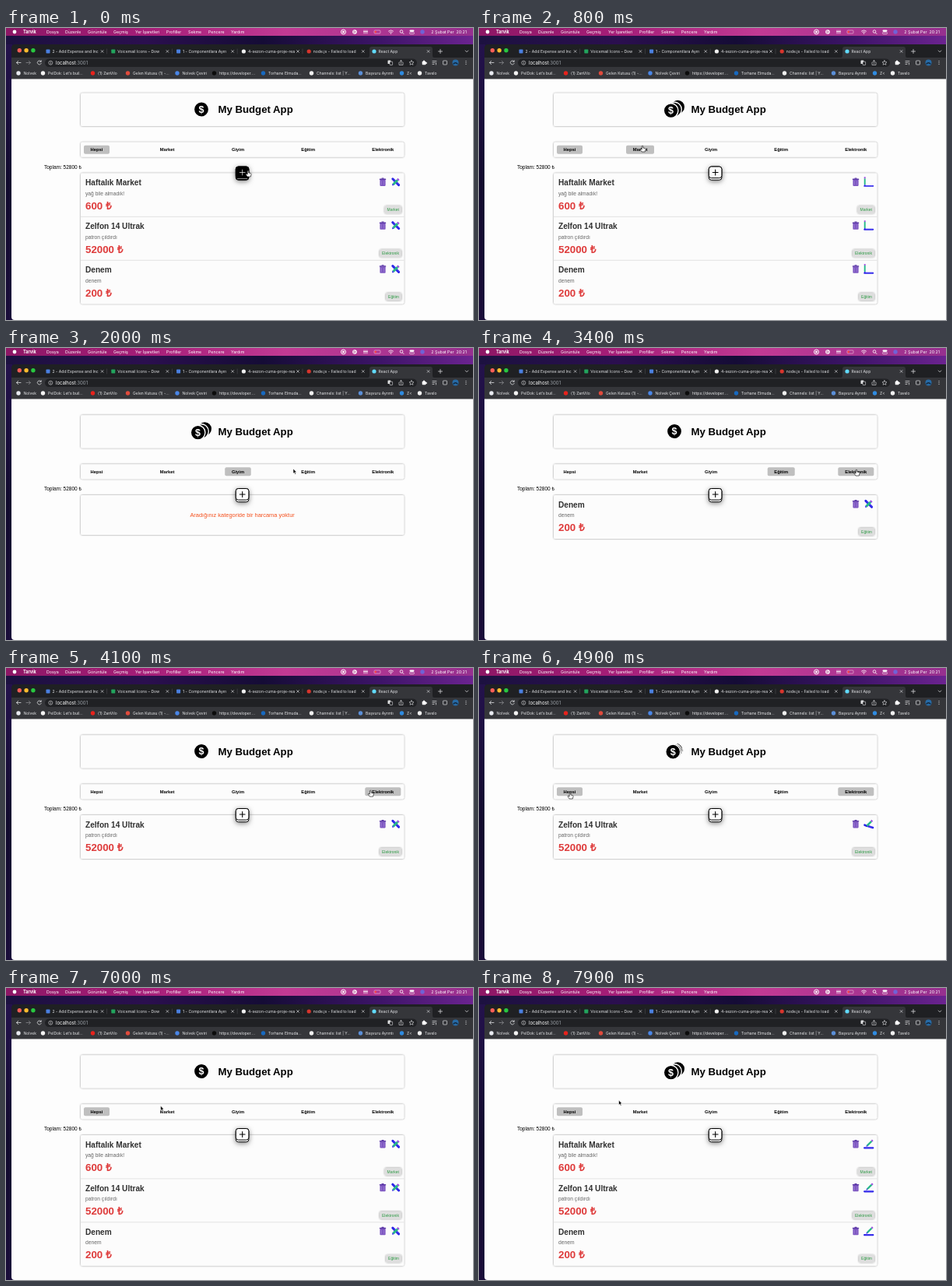
Animation, 600 px wide and 375 px high, one loop 8 s. Source, as an HTML page:

```html
<!DOCTYPE html>
<html lang="tr">
<head>
<meta charset="utf-8">
<title>My Budget App</title>
<style>
  html, body { margin: 0; width: 100%; height: 100%; overflow: hidden; background: #120b2c; }
  svg { display: block; width: 100vw; height: 100vh; }
  svg svg { width: 61px; height: 13px; }
  text { white-space: pre; }
  .ui { font-family: Inter, Roboto, sans-serif; }
  .page { font-family: "Liberation Sans", Arial, sans-serif; }
  .bold { font-weight: 700; }
</style>
</head>
<body>
<svg viewBox="0 0 600 375" xmlns="http://www.w3.org/2000/svg">
  <defs>
    <linearGradient id="bar">
      <stop offset="0" stop-color="#8d1765"/><stop offset=".3" stop-color="#a51e78"/>
      <stop offset=".6" stop-color="#c23a94"/><stop offset="1" stop-color="#96308f"/>
    </linearGradient>
    <linearGradient id="wall">
      <stop offset="0" stop-color="#1c1140"/><stop offset=".3" stop-color="#2b0f4f"/>
      <stop offset=".55" stop-color="#150c36"/><stop offset=".8" stop-color="#3d1468"/>
      <stop offset="1" stop-color="#6c2390"/>
    </linearGradient>
    <linearGradient id="side" x2="0" y2="1">
      <stop offset="0" stop-color="#24124c"/><stop offset=".5" stop-color="#120b2e"/>
      <stop offset="1" stop-color="#1a0d3a"/>
    </linearGradient>
    <filter id="soft" x="-10%" y="-20%" width="120%" height="140%">
      <feDropShadow dx="0" dy="0" stdDeviation="1.1" flood-opacity=".48"/>
    </filter>
    <filter id="glow" x="-60%" y="-60%" width="220%" height="220%">
      <feDropShadow dx="0" dy="1.5" stdDeviation="3.4" flood-opacity=".5"/>
    </filter>
    <clipPath id="window"><path d="M12 21H600V375H11Q7 375 7 371V26Q7 21 12 21Z"/></clipPath>
  </defs>
  <g id="desktop"></g>
  <g clip-path="url(#window)"><g id="page" class="page"></g></g>
  <g id="pointer"></g>
</svg>
<script>
const LOOP = 8000, STEP = 100;
const byId = id => document.getElementById(id);

// Drawing helpers
const rect = (x, y, w, h, fill, r = 0, extra = '') =>
  `<rect x="${x}" y="${y}" width="${w}" height="${h}" rx="${r}" fill="${fill}" ${extra}/>`;
const dot = (x, y, r, fill, extra = '') => `<circle cx="${x}" cy="${y}" r="${r}" fill="${fill}" ${extra}/>`;
const line = (d, color, width = .8, extra = '') =>
  `<path d="${d}" fill="none" stroke="${color}" stroke-width="${width}" stroke-linecap="round" stroke-linejoin="round" ${extra}/>`;
const text = (x, y, size, fill, label, extra = '') =>
  `<text x="${x}" y="${y}" font-size="${size}" fill="${fill}" ${extra}>${label}</text>`;
const group = (x, y, body, angle = 0) => `<g transform="translate(${x} ${y}) rotate(${angle})">${body}</g>`;
const MIDDLE = 'text-anchor="middle"', BOLD = 'class="bold"';

// Eased interpolation over [time, ...values] keys
function track(t, keys) {
  const next = keys.findIndex(k => k[0] > t);
  if (next < 0) return keys[keys.length - 1].slice(1);
  if (next === 0) return keys[0].slice(1);
  const a = keys[next - 1], b = keys[next];
  const u = (t - a[0]) / (b[0] - a[0]), e = u * u * (3 - 2 * u);
  return a.slice(1).map((v, i) => v + (b[i + 1] - v) * e);
}

// Desktop and browser window
const menus = [[52, 'Dosya'], [76, 'Düzenle'], [105, 'Görüntüle'], [138, 'Geçmiş'], [166, 'Yer İşaretleri'],
  [206, 'Profiller'], [234, 'Sekme'], [260, 'Pencere'], [289, 'Yardım']];
const tabs = [['#4a7fe0', '2 - Add Expense and Inc'], ['#22a45d', 'Voicemail Icons – Dow'],
  ['#4a7fe0', '1 - Componentlara Ayırı'], ['#f0f0f0', '4-sezon-cuma-proje-rea'],
  ['#d8342c', 'node.js - Failed to load'], ['#61dafb', 'React App']];
const bookmarks = [[16, '#e8eaf0', 'Nolvek'], [47.5, '#f2f2f2', 'PelDok: Let’s buil...'], [111.5, '#e8221c', '(1) ZanVilo'],
  [156.5, '#e04a3c', 'Gelen Kutusu (1) -...'], [220, '#4a86e8', 'Nolvek Çeviri'], [267.5, '#0c0c0c', 'https://developer....'],
  [330.5, '#1769c0', 'Torhane Elmuda...'], [392.5, '#f2f2f2', 'Channels: list | Y...'], [455.5, '#5b8fd8', 'Başvuru Ayrıntı'],
  [508.5, '#2f8be0', 'Z&lt;'], [531.5, '#f2f2f2', 'Tavelo']];

function menuBar() {
  const white = '#fff';
  return rect(0, 0, 600, 375, 'url(#wall)') + rect(0, 21, 8, 354, 'url(#side)') + rect(0, 0, 600, 10, 'url(#bar)') +
    dot(11, 5, 2.4, white) + text(22, 7, 5.5, white, 'Tarvik', BOLD) +
    menus.map(([x, label]) => text(x, 7, 5.3, white, label)).join('') +
    dot(433.5, 5, 3, 'none', 'stroke="#fff"') + dot(433.5, 5, 1.5, white) +
    dot(448, 5, 2.8, white) + line('M447.2 3.7L449.5 5L447.2 6.3Z', '#a63383', .6) +
    line('M460 3V7M462 3V7M464 3V7M459.5 4.5H464.5', white, .7) +
    rect(473, 3, 8, 4, 'none', 1, 'stroke="#f3c4e2" stroke-width=".6"') + rect(473.7, 3.7, 2, 2.6, '#ff4438', .4) +
    line('M491.5 4Q494.5 1.5 497.5 4M492.8 5.5Q494.5 4 496.2 5.5', white) + dot(494.5, 7, .7, white) +
    dot(508, 4.5, 1.8, 'none', 'stroke="#fff" stroke-width=".8"') + line('M509.4 6L511 7.6', white) +
    rect(518.5, 2.4, 6, 2.3, white, 1.1) + rect(518.5, 5.4, 6, 2.3, 'none', 1.1, 'stroke="#fff" stroke-width=".6"') +
    dot(535, 5, 2.7, '#6f62d6') + text(592, 7, 5.3, white, '2 Şubat Per  20:21', 'text-anchor="end"');
}

function tabStrip() {
  let out = rect(7, 21, 593, 18, '#1f2023') + ['#ff5f57', '#febc2e', '#28c840'].map((c, i) => dot(17.3 + i * 8.8, 28.8, 2.7, c)).join('');
  out += '<path d="M465 38Q467 38 467 35V27Q467 24 470 24H545Q548 24 548 27V35Q548 38 550 38Z" fill="#35363a"/>';
  tabs.forEach(([color, label], i) => {
    const x = 54 + i * 83.8, end = x + 69.6;
    out += i > 2 ? dot(x, 30, 2.6, color) : rect(x - 2.5, 27.5, 5, 5, color, .8);
    out += `<svg x="${x + 5}" y="24" width="61" height="13">${text(.5, 8, 5.1, '#e4e5e8', label)}</svg>`;
    out += line(`M${end - 1.4} 28.6l2.8 2.8m0 -2.8l-2.8 2.8`, '#d5d6d8', .7);
    if (i < 4) out += line(`M${end + 6} 27V33`, '#55565a', .5);
  });
  return out + line('M555.5 30H560.5M558 27.5V32.5', '#d5d6d8') + line('M590.2 29L592 30.8L593.8 29', '#d5d6d8');
}

function toolbar() {
  const pale = '#dfe0e2';
  return rect(7, 38, 593, 28, '#35363a') + rect(50, 39.5, 478, 10.5, '#202124', 5.2) +
    line('M19 44.5H13.5M15.7 42.3L13.5 44.5L15.7 46.7', pale) + line('M26 44.5H31.5M29.3 42.3L31.5 44.5L29.3 46.7', '#85868a') +
    line('M45 43A2.5 2.5 0 1 0 45.2 45.5M45.2 41.7V43.3H43.6', pale) +
    dot(57.3, 44.7, 2.5, 'none', `stroke="${pale}" stroke-width=".6"`) + line('M57.3 44.5V46M57.3 43.3V43.4', pale, .6) +
    text(64, 46.7, 6, '#fff', 'localhost<tspan fill="#9aa0a6">:3001</tspan>') +
    rect(490.5, 41.5, 3.8, 4.6, pale, .6) + rect(493, 43.2, 3.6, 4.4, '#202124', .6, `stroke="${pale}" stroke-width=".6"`) +
    line('M505.7 44H505V47.5H510V44H509.3M507.5 46V41.5M506.2 42.7L507.5 41.4L508.8 42.7', pale, .6) +
    line('M521 41.6l.9 2 2.1.2-1.6 1.4.5 2.1-1.9-1.1-1.9 1.1.5-2.1-1.6-1.4 2.1-.2Z', pale, .6) +
    rect(534.7, 42.7, 4.8, 4.6, '#fff', .7) + dot(537, 42.4, 1, '#fff') + dot(540, 45, 1, '#fff') +
    line('M548 42.5H553M548 44.5H551M548 46.5H550M552.5 44.5V47', pale, .7) +
    rect(561.5, 42, 5, 5, 'none', .6, `stroke="${pale}" stroke-width=".7"`) +
    dot(577.5, 44.5, 4, '#276aa5') + line('M575 46Q577 43.5 580 46', '#11263c', 1.4) +
    [42.5, 44.5, 46.5].map(y => dot(591, y, .6, pale)).join('') +
    bookmarks.map(([x, color, label]) => dot(x, 58, 2.7, color) + text(x + 6.6, 60, 5, '#e8e9eb', label)).join('');
}

byId('desktop').innerHTML = `<g class="ui">${menuBar()}<g clip-path="url(#window)">${tabStrip()}${toolbar()}${rect(7, 65.5, 593, 310, '#fdfdfd')}</g></g>`;

// Page data
const nav = [['Hepsi', 116.5, 33], ['Market', 207, 36], ['Giyim', 298, 33.5], ['Eğitim', 388.2, 35], ['Elektronik', 484.3, 46]];
const expenses = [
  { title: 'Haftalık Market', note: 'yağ bile almadık!', price: '600 ₺', kind: 'Market', tag: 21.5 },
  { title: 'Zelfon 14 Ultrak', note: 'patron çıldırdı', price: '52000 ₺', kind: 'Elektronik', tag: 28 },
  { title: 'Denem', note: 'denem', price: '200 ₺', kind: 'Eğitim', tag: 20 }
];

// Timelines
const clicks = [[0, 'Hepsi'], [1000, 'Market'], [1700, 'Giyim'], [2300, 'Eğitim'], [3800, 'Elektronik'], [5100, 'Hepsi']];
const pointerKeys = [[0, 311, 183], [100, 311, 183], [800, 210, 151], [1200, 209, 155], [1600, 299, 156], [1800, 302, 156],
  [2000, 369, 155], [2200, 388, 156], [2700, 390, 156], [3300, 485, 156], [4000, 484, 157], [4800, 117, 160],
  [5200, 117, 160], [5800, 301.5, 190], [6400, 301.5, 190], [7200, 179.5, 144]];
const coinKeys = [[200, 0], [600, 1], [2300, 1], [2700, 0], [4750, 0], [5100, 1], [5500, 1], [5900, 0], [7300, 0], [7700, 1]];
// ruler y, ruler angle, pencil x, pencil y, pencil angle, thickness
const crossed = [0, 45, 0, 0, -45, 3], drawing = [5.2, 0, 1.3, -1, -45, 2.3], upright = [5.2, 0, -5, -1, -90, 1.9];
const penKeys = [[200, ...crossed], [500, ...drawing], [750, ...upright], [900, ...upright], [1500, ...crossed],
  [4700, ...crossed], [5050, ...drawing], [5250, ...upright], [5800, ...crossed], [7250, ...crossed], [7700, ...drawing]];

function coins(spread) {
  const at = k => [251 + k * spread, 107 - 2.5 * (1 - spread) - k * spread * .72];
  const coin = ([x, y]) => dot(x, y, 9.6 - spread * .3, '#000', 'stroke="#fcfcfc" stroke-width="1.4"');
  const front = at(-4.4);
  front[1] -= spread * 1.6;
  return coin(at(4.4)) + coin(at(0)) + coin(front) + text(front[0], front[1] + 4.4, 12.5, '#fff', '$', `${BOLD} ${MIDDLE}`);
}

function trash() {
  return rect(-3.6, -3, 7.2, 8.2, '#7e57c2', .8) + rect(-4.2, -4.2, 8.4, 1.5, '#5e3aa8', .5) +
    rect(-1.6, -5.2, 3.2, 1.3, '#5e3aa8', .4) + line('M-1.5 -1V3.5M1.5 -1V3.5', '#a58ad8', .6);
}

function pen([rulerY, rulerAngle, x, y, angle, width]) {
  const butt = 'style="stroke-linecap:butt"';
  const ruler = line('M-5.5 0H5.5', '#2a22e6', width) + line('M-3.5 -.4H5', '#6a5cff', .7, 'stroke-dasharray=".6 1.3"');
  const pencil = line('M-4.5 0H3.5', '#27b889', width, butt) +
    `<path d="M-4.5 ${-width / 2}L-6.6 0L-4.5 ${width / 2}Z" fill="#2a22e6"/>` + line('M3.5 0H5.4', '#9a4be0', width, butt);
  return group(0, rulerY, ruler, rulerAngle) + group(x, y, pencil, angle);
}

function expense(item, top, pose) {
  const left = 508 - item.tag;
  return text(102, top + 15.7, 10.1, '#303030', item.title, BOLD) + text(102, top + 28.4, 6.7, '#666', item.note) +
    text(102, top + 46.3, 13.3, '#de3b3b', item.price, BOLD) +
    group(484, top + 11.2, trash()) + group(500.7, top + 11.2, pen(pose)) +
    rect(left, top + 42, item.tag, 9.8, '#dedede', 2, 'filter="url(#soft)"') +
    text(left + item.tag / 2, top + 48.6, 5, '#2e9a45', item.kind, MIDDLE);
}

function addButton(hover) {
  const ink = hover ? '#fff' : '#000', face = hover ? '#000' : '#fcfcfc', edge = 'stroke="#000" stroke-width="1"';
  return `<g filter="url(#glow)">${rect(295.3, 180.5, 16.6, 17.2, face, 3.2, edge)}</g>` +
    rect(295.3, 180.5, 16.6, 14.6, face, 3.2, edge) +
    (hover ? line('M297.5 196H309.8', '#e8e8e8', .6) : '') + line('M300.3 188H307.1M303.7 184.6V191.4', ink, hover ? .7 : 1.1);
}

const panel = (y, h) => rect(96, y, 415.3, h, '#fcfcfc', 2, 'filter="url(#soft)"');
const scrollAt = t => t < 1000 ? -2.5 : 0;

function hoverAt(t) {
  const [x, y] = track(t, pointerKeys), py = y - scrollAt(t);
  if (x > 295 && x < 312.5 && py > 180 && py < 198) return 'add';
  const hit = nav.find(([, cx, w]) => Math.abs(x - cx) < w / 2 && py > 152.5 && py < 164.5);
  return hit ? hit[0] : '';
}

function page(t) {
  const active = clicks.filter(c => c[0] <= t).pop()[1], hover = hoverAt(t);
  const shown = expenses.filter(e => active === 'Hepsi' || e.kind === active);
  const pose = track(t, penKeys), height = shown.length ? shown.length * 55.9 : 51;
  let out = panel(86.3, 42.3) + group(0, 2.5 * (1 - track(t, coinKeys)[0]), coins(track(t, coinKeys)[0])) +
    text(272.5, 111.7, 13.2, '#000', 'My Budget App', BOLD) + panel(149.2, 19);
  for (const [label, x, w] of nav) {
    if (label === active || label === hover) out += rect(x - w / 2, 153.3, w, 11, '#bfbfbf', 2);
    out += text(x, 160.9, 5.8, '#000', label, `${BOLD} ${MIDDLE}`);
  }
  out += text(49, 183, 6.5, '#000', 'Toplam: 52800 ₺') + panel(189, height);
  shown.forEach((item, i) => {
    const top = 189 + i * 55.9;
    if (i) out += line(`M96 ${top}H511`, '#d9d9d9', .7);
    out += expense(item, top, pose);
  });
  if (!shown.length) out += text(303.6, 216.8, 7.45, '#f4511e', 'Aradığınız kategoride bir harcama yoktur', MIDDLE);
  return group(0, scrollAt(t), out + addButton(hover === 'add'));
}

function pointer(t) {
  const [x, y] = track(t, pointerKeys);
  const hand = hoverAt(t) && hoverAt(Math.max(0, t - STEP));
  const shape = hand
    ? 'M-.8 .6Q0 -.5 .8 .6V3L3.4 3.6Q4.3 4 4 5.2L3.3 8H-.9L-3 5Q-3 4 -2 4.2L-.8 5.1Z'
    : 'M0 0V6.2L1.4 5L2.4 7.2L3.5 6.7L2.5 4.6H4.4Z';
  const [fill, edge] = hand ? ['#fff', '#000'] : ['#000', '#fff'];
  return group(x, y, `<path d="${shape}" fill="${fill}" stroke="${edge}" stroke-width=".6" stroke-linejoin="round"/>`);
}

let last = -1;
function draw(now) {
  const t = Math.floor((now % LOOP) / STEP) * STEP;
  if (t === last) return;
  byId('page').innerHTML = page(t);
  byId('pointer').innerHTML = pointer(t);
  last = t;
}

const start = performance.now();
function tick() {
  draw(performance.now() - start);
  requestAnimationFrame(tick);
}
tick();
</script>
</body>
</html>
```
